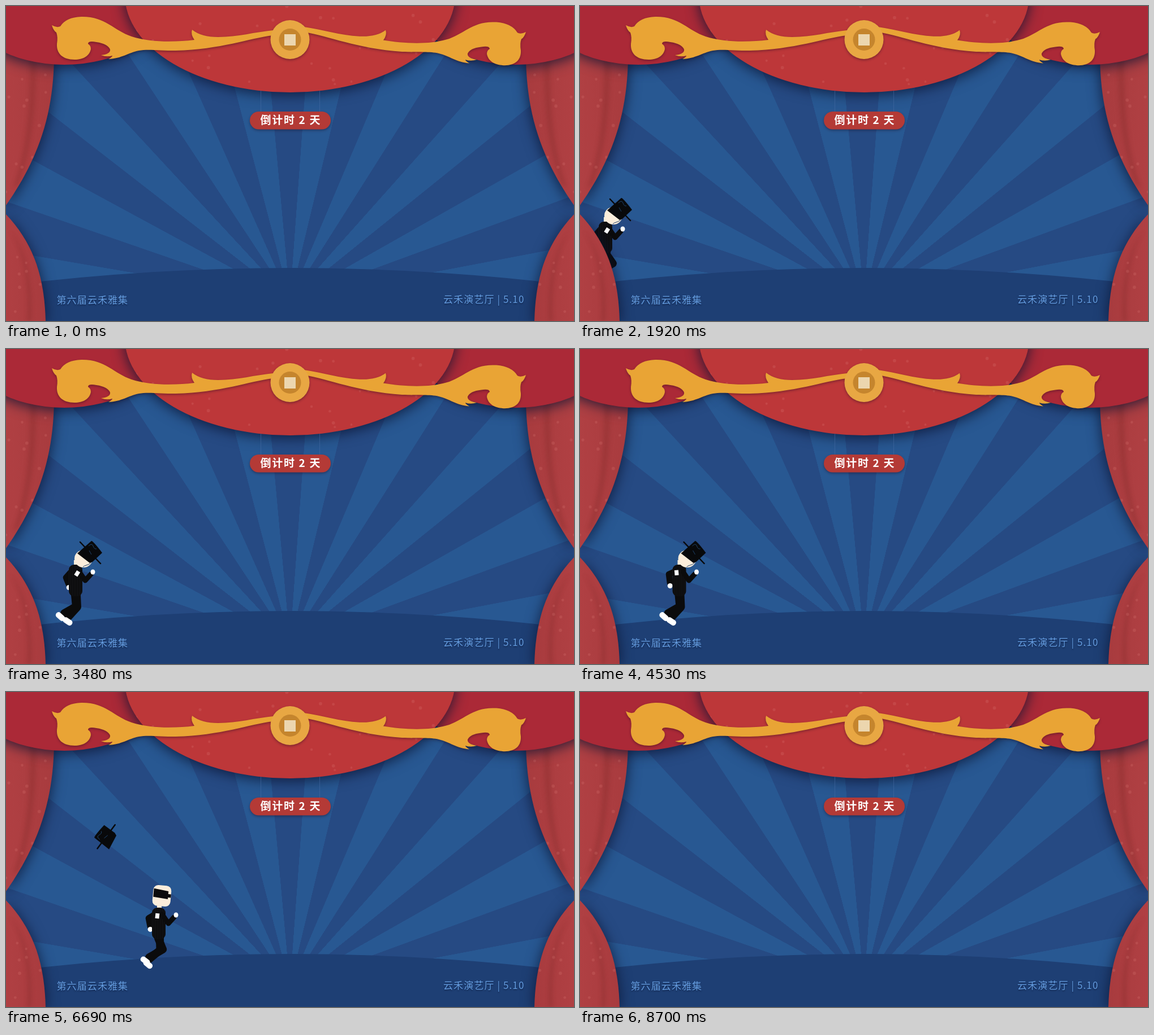
Animation, 1004 px wide and 558 px high, one loop 9600 ms. Source, as an HTML page:

```html
<!DOCTYPE html>
<html lang="zh">
<head>
<meta charset="utf-8">
<title>倒计时</title>
<style>
  html, body { margin: 0; width: 100%; height: 100%; overflow: hidden; }
  body {
    background: repeating-conic-gradient(from -98.99deg at 502px 520px,
      #264a83 0 9.3deg, #285892 9.38deg 18.68deg, #264a83 18.76deg);
  }
  svg { display: block; width: 100%; height: 100%; }
  text { font-family: "Noto Sans CJK SC", "Noto Sans CJK", "Noto Sans", sans-serif; white-space: pre; }
  .cloth { filter: drop-shadow(0 4px 12px rgba(9, 20, 50, .85)); }
  .small { filter: drop-shadow(0 2px 2px rgba(30, 10, 30, .4)); }
  .caption { font-size: 17px; font-weight: 300; letter-spacing: 1.1px; fill: #649cdf;
    filter: drop-shadow(0 2px 1px rgba(8, 20, 50, .5)); }
  .limb { fill: none; stroke: #0b0b0c; stroke-linecap: round; stroke-linejoin: round; }
  .spots circle { fill: #e2807c; opacity: .2; }
</style>
</head>
<body>
<svg viewBox="0 0 1004 558">
  <defs>
    <linearGradient id="drape">
      <stop offset="0" stop-color="#b04043"/><stop offset="1" stop-color="#a83b3e"/>
    </linearGradient>
    <pattern id="pinstripe" width="3" height="3" patternUnits="userSpaceOnUse">
      <rect width="3" height="3" fill="#0b0b0c"/><rect width=".6" height="3" fill="#1b1b20"/>
    </pattern>
    <path id="upper" d="M0 0H87L85 95C83 180 65 260 0 353Z"/>
    <path id="lower" d="M0 369C48 420 68 478 70 558H0Z"/>
    <ellipse id="swag" cx="502" cy="-20" rx="292" ry="173"/>
    <clipPath id="upperClip"><use href="#upper"/></clipPath>
    <clipPath id="lowerClip"><use href="#lower"/></clipPath>
    <clipPath id="swagClip"><use href="#swag"/></clipPath>
    <filter id="soft" x="-50%" width="200%"><feGaussianBlur stdDeviation="3"/></filter>

    <g id="curtain">
      <use href="#upper" class="cloth" fill="url(#drape)"/>
      <g clip-path="url(#upperClip)">
        <path d="M42 90C42 190 36 260 12 322L22 316C44 260 54 190 54 90Z" fill="#8f3033" opacity=".45" filter="url(#soft)"/>
        <g class="spots" data-area="0 90 86 260" data-count="15"></g>
      </g>
      <use href="#lower" class="cloth" fill="url(#drape)"/>
      <g clip-path="url(#lowerClip)">
        <path d="M6 398C30 430 42 490 37 558H45C48 490 36 430 6 398Z" fill="#8f3033" opacity=".45" filter="url(#soft)"/>
        <g class="spots" data-area="0 380 70 178" data-count="9"></g>
      </g>
      <ellipse class="cloth" cx="103" cy="0" rx="172" ry="104" fill="#ab2937"/>
    </g>

    <path id="scroll" d="M81 34Q90 39 96 36Q106 20 133 19C175 18 190 43 222 54C255 65 300 64 333 60
      Q326 50 329 42Q345 55 375 55C410 55 440 46 472 43V52C430 57 380 77 300 79C270 79 250 76 235 79
      C215 83 205 93 181 94Q188 90 188 88Q178 91 168 87Q185 85 184 77Q180 67 160 64Q145 61 145 67
      Q150 70 150 76C148 88 137 95 121 95C100 95 89 84 90 67Q92 55 89 47Q84 44 81 34Z"/>
  </defs>

  <path d="M0 495Q502 433 1004 495V558H0Z" fill="#1e3f74"/>

  <g id="walker">
    <path id="backArm" class="limb" stroke-width="11"/>
    <circle id="backHand" r="4.500" fill="#fff"/>
    <path id="legA" class="limb" stroke-width="14"/>
    <path id="legB" class="limb" stroke-width="14"/>
    <rect id="shoeA" x="-9" y="-5" width="18" height="10" rx="4.5" fill="#fff"/>
    <rect id="shoeB" x="-9" y="-5" width="18" height="10" rx="4.5" fill="#fff"/>
    <path d="M-3 374H5V385H-3Z" fill="#fbeddb"/>
    <rect x="-12" y="382" width="24" height="56" rx="9" fill="url(#pinstripe)"/>
    <path class="limb" stroke-width="9" d="M6 394L17 410L27 399"/>
    <ellipse cx="30.500" cy="395" rx="4" ry="4.500" fill="#fff"/>
    <rect id="badge" x="-3.5" y="-4.5" width="7" height="9" fill="#fff"/>
    <g id="bowedHead">
      <ellipse cx="14" cy="371.500" rx="16" ry="15.500" fill="#fbeddb"/>
      <path d="M30 374Q27 381 19 383Q15 384 13 386" fill="none" stroke="#1f3d66"/>
    </g>
    <g id="bareHead" transform="translate(5.500 361) rotate(5)">
      <rect x="-16" y="-18.500" width="32" height="37" rx="9" fill="#fbeddb"/>
      <path d="M-15-12L11-9V-4H16V2H11V5L-15 3Z" fill="#0b0b0c"/>
    </g>
  </g>

  <g id="hat">
    <path d="M-24 2L1-20Q4-20 20 1L3 17L-2 19Z" fill="#08090b"/>
    <path d="M-19-18L17 20" stroke="#08090b" stroke-width="2.500" stroke-linecap="round"/>
    <path d="M-4-11Q2-17 4-11T10-6M-3-3L1 4" fill="none" stroke="#24507f" stroke-width=".8"/>
  </g>

  <use href="#curtain"/>
  <use href="#curtain" transform="matrix(-1 0 0 1 1004 0)"/>
  <use href="#swag" class="cloth" fill="#bd3739"/>
  <g clip-path="url(#swagClip)">
    <g class="spots" data-area="215 0 575 150" data-count="40"></g>
  </g>

  <g class="small" fill="#e9a435">
    <use href="#scroll"/>
    <use href="#scroll" transform="matrix(-1 -.045 0 1 1000 15.6)"/>
    <circle cx="502" cy="59.500" r="34.500" fill="#e8a743"/>
  </g>
  <circle cx="502" cy="59.500" r="19.500" fill="#c5852d"/>
  <rect x="492" y="50" width="20" height="20" fill="#ecd6ae"/>

  <path d="M450.500 150V188M554.500 150V188" stroke="#4a6fa5" stroke-opacity=".5"/>
  <rect class="small" x="431" y="187" width="143" height="31.500" rx="15.750" fill="#b43a36"/>
  <text x="449.500" y="209" font-size="19" font-weight="900" letter-spacing="1.7" fill="#fff">倒计时 2 天</text>
  <text class="caption" x="89.500" y="527">第六届云禾雅集</text>
  <text class="caption" x="773" y="526">云禾演艺厅 | 5.10</text>
</svg>
<script>
const LOOP = 9600, STEP = 30, STRIDE = 700;
const STOP = 6420, TURN = 7857, GONE = 8700;
const el = id => document.getElementById(id);
const set = (id, name, value) => el(id).setAttribute(name, value);
const show = (id, on) => set(id, 'visibility', on ? 'visible' : 'hidden');
const place = (id, x, y, angle = 0) => set(id, 'transform', `translate(${x} ${y}) rotate(${angle})`);
const line = (id, ...points) => set(id, 'd', 'M' + points.map(p => p.join(' ')).join('L'));

let seed = 7;
const random = () => (seed = seed * 16807 % 2147483647) / 2147483647;

function scatterSpots(group) {
  const [x, y, w, h] = group.dataset.area.split(' ').map(Number);
  for (let i = 0; i < group.dataset.count; i++) {
    const spot = document.createElementNS('http://www.w3.org/2000/svg', 'circle');
    spot.setAttribute('cx', x + random() * w);
    spot.setAttribute('cy', y + random() * h);
    spot.setAttribute('r', 2 + random());
    group.append(spot);
  }
}

function bodyX(t) {
  if (t < TURN) return Math.min(-51 + t * .05, 270);
  return 270 - (t - TURN) * .367;
}

function moveLimbs(t) {
  const phase = (t - 3480) / STRIDE;
  const wave = shift => Math.cos(2 * Math.PI * (phase - shift));
  const arm = wave(.886), leg = wave(.25);

  const hand = [-14 + 3 * arm, 421 + 2 * arm];
  line('backArm', [-7, 394], [-17.5 + arm, 402 + 4 * arm], [hand[0], hand[1] - 5]);
  place('backHand', ...hand);
  place('badge', 5 * arm - 1, 397 + arm, 14 + 25 * arm);

  const footA = [-27 - 6 * leg, 474 - 4 * leg];
  const footB = [-14 + 10 * leg, 482.5];
  line('legA', [-1, 436], [1 - 12 * leg, 456], [footA[0] + 7, footA[1] - 6]);
  line('legB', [2, 436], [3 + leg, 457], [footB[0] + 2, footB[1] - 9]);
  place('shoeA', ...footA, 42 + 10 * leg);
  place('shoeB', ...footB, 34 - 12 * leg);
}

function draw(t) {
  const x = bodyX(t), onStage = t < GONE, hatted = t < STOP;
  const flight = Math.max(0, (t - STOP) / 540);
  el('walker').style.display = onStage ? '' : 'none';
  set('walker', 'transform', `translate(${x} 0) scale(${t < TURN ? 1 : -1} 1)`);
  show('bowedHead', hatted);
  show('bareHead', !hatted);
  show('hat', flight < 1.04);
  if (hatted) place('hat', x + 27, 360);
  else place('hat', 297 - 242 * flight, 360 - 209 * flight, -200 * flight);
  moveLimbs(t);
}

document.querySelectorAll('.spots').forEach(scatterSpots);
const start = performance.now();
function tick() {
  const t = (performance.now() - start) % LOOP;
  draw(Math.floor(t / STEP) * STEP);
  requestAnimationFrame(tick);
}
tick();
</script>
</body>
</html>
```
